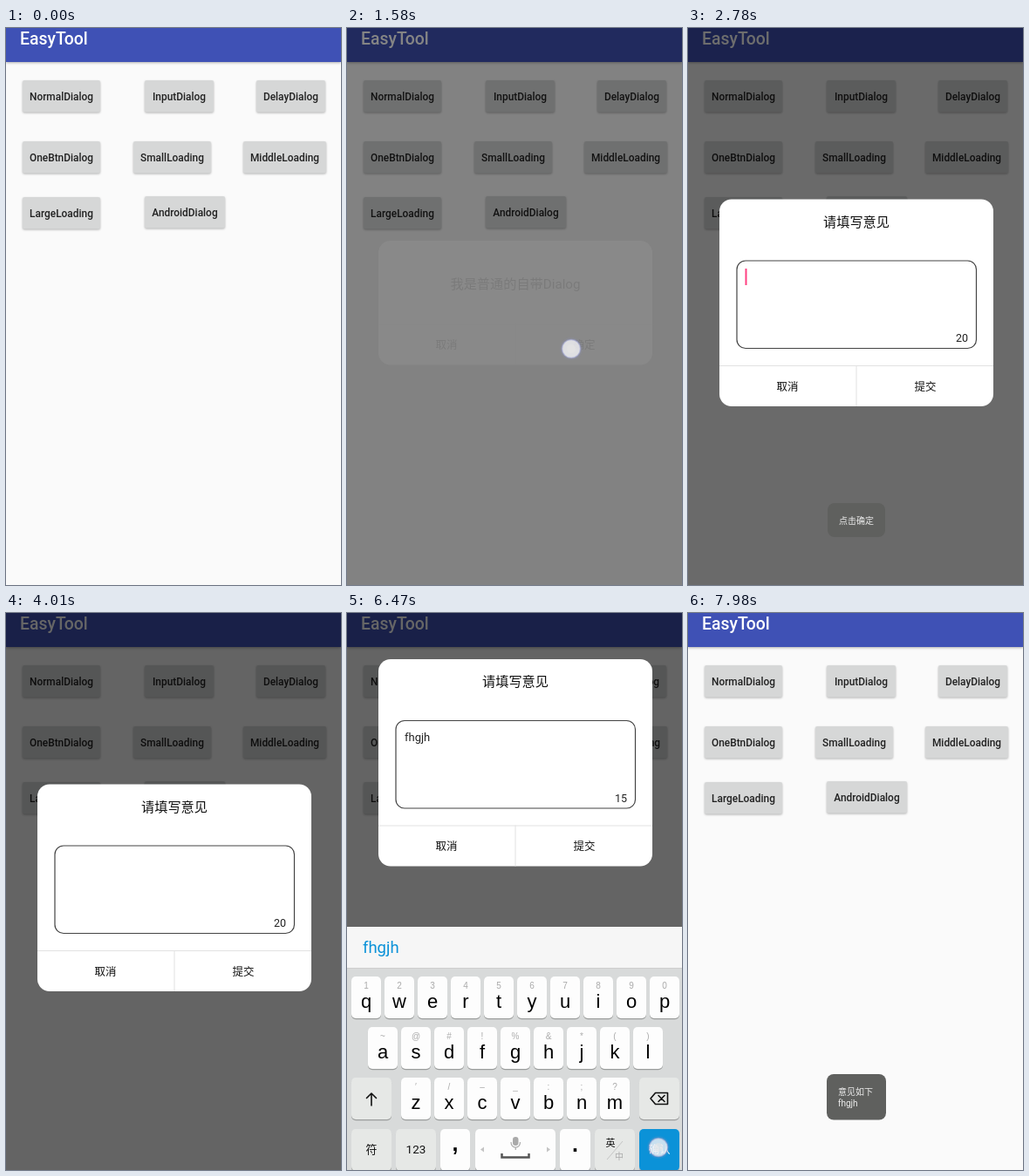
An HTML page that plays this animation: 384 px wide and 639 px high, repeating every 8 s.

```html
<!DOCTYPE html>
<html lang="zh-CN">
<head>
<meta charset="utf-8">
<title>EasyTool</title>
<style>
  html, body { margin: 0; width: 100%; height: 100%; overflow: hidden; background: #fafafa; }
  svg { display: block; width: 100%; height: 100%; }
  text { font-family: Roboto, "Noto Sans CJK SC", "Noto Sans CJK", sans-serif; white-space: pre; }
  .mid { text-anchor: middle; }
  .end { text-anchor: end; }
  .bold { font-weight: 500; }
  .key { font-family: "Liberation Sans", "Noto Sans CJK SC", "Noto Sans CJK", sans-serif; text-anchor: middle; }
  .raised { filter: drop-shadow(0 1px 1px rgba(0, 0, 0, .28)); }
  .bar { filter: drop-shadow(0 1.5px 1.5px rgba(0, 0, 0, .3)); }
  .icon { fill: none; stroke: #666; stroke-width: 1.6; stroke-linecap: round; stroke-linejoin: round; }
</style>
</head>
<body>
<svg id="stage" viewBox="0 0 384 639"></svg>
<script>
const LOOP = 8000;
const BLUE = '#0b92d8';
const KEYBOARD_HEIGHT = 279;

const rect = (x, y, w, h, fill, rx = 0, extra = '') =>
  `<rect x="${x}" y="${y}" width="${w}" height="${h}" rx="${rx}" fill="${fill}" ${extra}/>`;
const text = (x, y, size, content, cls = 'mid', fill = '#111', extra = '') =>
  `<text x="${x}" y="${y}" font-size="${size}" class="${cls}" fill="${fill}" ${extra}>${content}</text>`;
const path = (d, extra = '') => `<path d="${d}" ${extra}/>`;
const group = (id, content, extra = '') => `<g id="${id}" ${extra}>${content}</g>`;

function appScreen() {
  const buttons = [
    [19, 60, 89, 'NormalDialog'], [159, 60, 79, 'InputDialog'], [287, 60, 79, 'DelayDialog'],
    [19, 130, 89, 'OneBtnDialog'], [146, 130, 89, 'SmallLoading'], [272, 130, 95, 'MiddleLoading'],
    [19, 194, 89, 'LargeLoading'], [159, 193, 92, 'AndroidDialog'],
  ];
  return rect(0, 0, 384, 639, '#fafafa')
    + rect(0, -10, 384, 49, '#3f51b5', 0, 'class="bar"')
    + text(16, 19, 19.4, 'EasyTool', 'bold', '#fff')
    + buttons.map(([x, y, w, label]) =>
        rect(x, y, w, 36.5, '#d6d7d7', 2, 'class="raised"')
        + text(x + w / 2, y + 23, 11.9, label, 'mid bold', '#212121')).join('');
}

// White card with a title and two actions along the bottom
function dialog(top, bottom, titleY, title, confirm) {
  const line = bottom - 47;
  return rect(36, top, 314, bottom - top, '#fff', 14)
    + rect(36, line, 314, 1, '#e2e2e2')
    + rect(192.5, line, 1, 47, '#e2e2e2')
    + text(193, titleY, 15.2, title)
    + text(114, bottom - 18.5, 12.5, '取消')
    + text(272, bottom - 18.5, 12.5, confirm);
}

function inputDialog() {
  return dialog(196.5, 434, 227.5, '请填写意见', '提交')
    + rect(56, 267, 274.5, 100.5, 'none', 10, 'stroke="#444" stroke-width="1.2"')
    + text(66, 290.5, 13, '', '', '#222', 'id="typed"')
    + rect(65.5, 276, 2, 19, '#ff4081', 0, 'id="caret"')
    + text(321, 360, 12.5, '20', 'end', '#222', 'id="remaining"');
}

function toolbarIcons() {
  const dots = [0, 1, 2].map(row => [0, 1, 2, 3].map(col =>
    rect(69 + col * 4.7, 377 + row * 4.2, 3, 2.6, '#666')).join('')).join('');
  const tiles = [[26, 377], [34, 377], [26, 385], [34, 385]].map(([x, y]) =>
    rect(x, y, 5.5, 5.5, 'none')).join('');
  return `<g class="icon">${tiles.replaceAll('fill="none"', '')}
    <circle cx="120" cy="383" r="7"/><path d="M125 388l5 5"/>
    <circle cx="165" cy="384" r="9"/><path d="M160.500 386q4.500 5 9 0zM161.500 381v.5M168.500 381v.5"/>
    <path d="M209 376v16M206.500 376h5M206.500 392h5M204 380l-4.500 4 4.500 4M214 380l4.500 4-4.500 4"/>
    <rect x="248.500" y="374" width="7.500" height="13" rx="3.750"/>
    <path d="M244 383c0 11 16.500 11 16.500 0M252.250 391v2.500"/>
    <rect x="287.500" y="378" width="17.500" height="12.500" rx="1"/>
    <path d="M291 387.500q2.500-3 5 0M299.500 386.500h3M300 382h2"/><circle cx="293.500" cy="382.500" r="1"/>
    <path d="M347 380.500l7 6.500 7-6.500"/></g>`.replaceAll('<rect ', '<rect fill="none" ')
    + dots + rect(73, 390, 10, 2, '#666')
    + '<circle cx="308.500" cy="373.500" r="1.800" fill="#f04a32"/>';
}

function keyboard() {
  const cap = (x, y, w, fill = '#fdfdfd') =>
    rect(x, y + 1.2, w, 48, '#9b9d9c', 5) + rect(x, y, w, 48, fill, 5);
  const grey = '#e6e8e6';
  const rows = [
    ['qwertyuiop', '1234567890', 22, 417],
    ['asdfghjkl', '~@#!%&*()', 41, 475],
    ['zxcvbnm', '′/–_:;?', 79, 533],
  ];
  const letters = rows.map(([keys, hints, x0, y]) => [...keys].map((letter, i) => {
    const x = x0 + i * 38;
    const hint = hints[i] === '&' ? '&amp;' : hints[i];
    return cap(x - 17, y, 34) + text(x, y + 14, 10, hint, 'key', '#aaa')
      + text(x, y + 36, 22, letter, 'key', '#000');
  }).join('')).join('');

  const enterIcon = path('M366 608v8h-15M355.500 611.500l-4.500 4.500 4.500 4.500',
    'class="icon" style="stroke:#111"');
  const bottomRow = cap(5, 592, 46, grey) + text(28, 620, 13, '符')
    + cap(56, 592, 46, grey) + text(79, 620, 13.5, '123')
    + cap(107, 592, 34) + text(124, 617, 25, ',', 'key', '#000', 'font-weight="bold"')
    + cap(147, 592, 92)
    + path('M157 612.500v6l-4-3zM229 612.500v6l4-3z', 'fill="#c4c4c4"')
    + rect(190, 601, 6.5, 10, '#aaa', 3.2)
    + path('M188 607c0 8 10.500 8 10.500 0M193.250 613v3', 'fill="none" stroke="#aaa" stroke-width="1.200"')
    + path('M177.500 620v4.500h31v-4.500', 'fill="none" stroke="#555" stroke-width="2.500"')
    + cap(244, 592, 35) + text(261.5, 618, 25, '.', 'key', '#000', 'font-weight="bold"')
    + cap(284, 592, 46, grey) + text(302, 612, 11, '英')
    + text(312, 627, 10, '中', 'mid', '#aaa')
    + path('M298 627L316 606', 'stroke="#bbb" stroke-width=".8"')
    + cap(335, 592, 46, grey) + enterIcon
    + group('confirmKey', rect(335, 592, 46, 48, BLUE, 5) + text(358, 620, 12.5, '确认', 'mid', '#fff'));

  return rect(0, 360, 384, 290, '#d8dada') + rect(0, 360, 384, 47, '#f6f6f6')
    + rect(0, 407, 384, 1, '#cfcfcf')
    + group('tools', toolbarIcons())
    + text(18, 390, 18.5, '', '', BLUE, 'id="candidate"')
    + letters
    + cap(5, 533, 46, grey)
    + path('M28 565v-14M22.500 556.500l5.500-5.500 5.500 5.500', 'class="icon" style="stroke:#111"')
    + cap(335, 533, 46, grey)
    + path('M348 557l5.500-6.500h14v13h-14zM357 553.500l7 7M364 553.500l-7 7', 'class="icon" style="stroke:#111"')
    + bottomRow
    + group('popup', '<circle r="27.500" fill="#fdfdfd" stroke="#999"/>'
        + text(0, 12, 36, '', 'key', BLUE, 'id="popupLetter"'));
}

const stage = document.getElementById('stage');
stage.innerHTML = appScreen()
  + rect(0, 0, 384, 639, '#000', 0, 'id="dim"')
  + group('normal', dialog(244, 386.5, 298.5, '我是普通的自带Dialog', '确定'))
  + group('input', inputDialog())
  + group('keyboard', keyboard())
  + group('confirmToast', rect(160, 545, 66, 39, '#5f605e', 8) + text(193, 568.5, 10, '点击确定', 'mid', '#eee'))
  + group('resultToast', rect(159, 529, 68, 52.5, '#5f605e', 8)
      + text(172, 552.5, 10, '意见如下', '', '#eee') + text(172, 566, 10, 'fhgjh', '', '#eee'))
  + group('touch', '<circle r="13" fill="#8c90b8" opacity=".18"/>'
      + '<circle r="10.500" fill="#f4f4f6" fill-opacity=".8" stroke="#a4a9d6" stroke-opacity=".6" stroke-width="1.500"/>'
      + '<circle r="5" fill="#e4e4e4" opacity=".6"/>');

const el = {};
for (const node of stage.querySelectorAll('[id]')) el[node.id] = node;

// Key presses: letter, time, finger x, finger y
const presses = [
  ['f', 4680, 155, 511], ['h', 4860, 231, 511], ['g', 5040, 193, 523],
  ['j', 5300, 269, 511], ['h', 5530, 231, 511],
];
// Touches: time, x, y, hold
const touches = [
  [370, 64, 72, 90], [1430, 257, 368, 170], [2410, 201, 65, 90],
  ...presses.map(([, time, x, y]) => [time, x, y, 60]),
  [6470, 357, 613, 80], [7480, 273, 270, 80],
];
const caretHidden = [[3090, 3570], [4010, 4140], [6030, 6500], [6990, 7480]];
const dialogs = { normal: [520, 1440], input: [2560, 7545] };
const commitTime = 6560;

const ramp = (t, start, length) => Math.min(1, Math.max(0, (t - start) / length));
const easeOut = p => 1 - (1 - p) ** 3;
const show = (node, visible) => node.setAttribute('visibility', visible ? 'inherit' : 'hidden');
const fade = (node, alpha) => {
  node.setAttribute('opacity', alpha);
  show(node, alpha > 0);
};
const move = (node, x, y) => node.setAttribute('transform', `translate(${x} ${y})`);

function render(t) {
  let dim = 0;
  for (const [id, [open, close]] of Object.entries(dialogs)) {
    fade(el[id], ramp(t, open, 200) - ramp(t, close, 150));
    dim += 0.6 * (easeOut(ramp(t, open, 340)) - ramp(t, close, 320) ** 2);
  }
  fade(el.dim, dim);

  const rise = easeOut(ramp(t, 4140, 290));
  const drop = ramp(t, 7630, 240) ** 2;
  move(el.input, 0, -143.5 * rise);
  move(el.keyboard, 0, KEYBOARD_HEIGHT * (1 - rise + drop));

  const typed = presses.filter(([, time]) => t >= time + 60).map(([letter]) => letter).join('');
  const composing = typed !== '' && t < commitTime;
  el.typed.textContent = typed;
  el.remaining.textContent = 20 - typed.length;
  el.candidate.textContent = composing ? typed : '';
  show(el.tools, !composing);
  show(el.confirmKey, composing);
  el.caret.setAttribute('x', 65.5 + (typed ? el.typed.getComputedTextLength() : 0));
  show(el.caret, !caretHidden.some(([from, to]) => t >= from && t < to));

  const press = presses.find(([, time]) => t >= time && t < time + 140);
  show(el.popup, press);
  if (press) {
    el.popupLetter.textContent = press[0];
    move(el.popup, press[2], 438);
  }

  fade(el.confirmToast, ramp(t, 1680, 260) - ramp(t, 3440, 410));
  fade(el.resultToast, ramp(t, 7710, 260));

  const touch = touches.findLast(([time]) => t >= time);
  fade(el.touch, touch ? 1 - ramp(t, touch[0] + touch[3], 80) : 0);
  if (touch) move(el.touch, touch[1], touch[2]);
}

function tick() {
  render(performance.now() % LOOP);
  requestAnimationFrame(tick);
}
tick();
</script>
</body>
</html>
```
